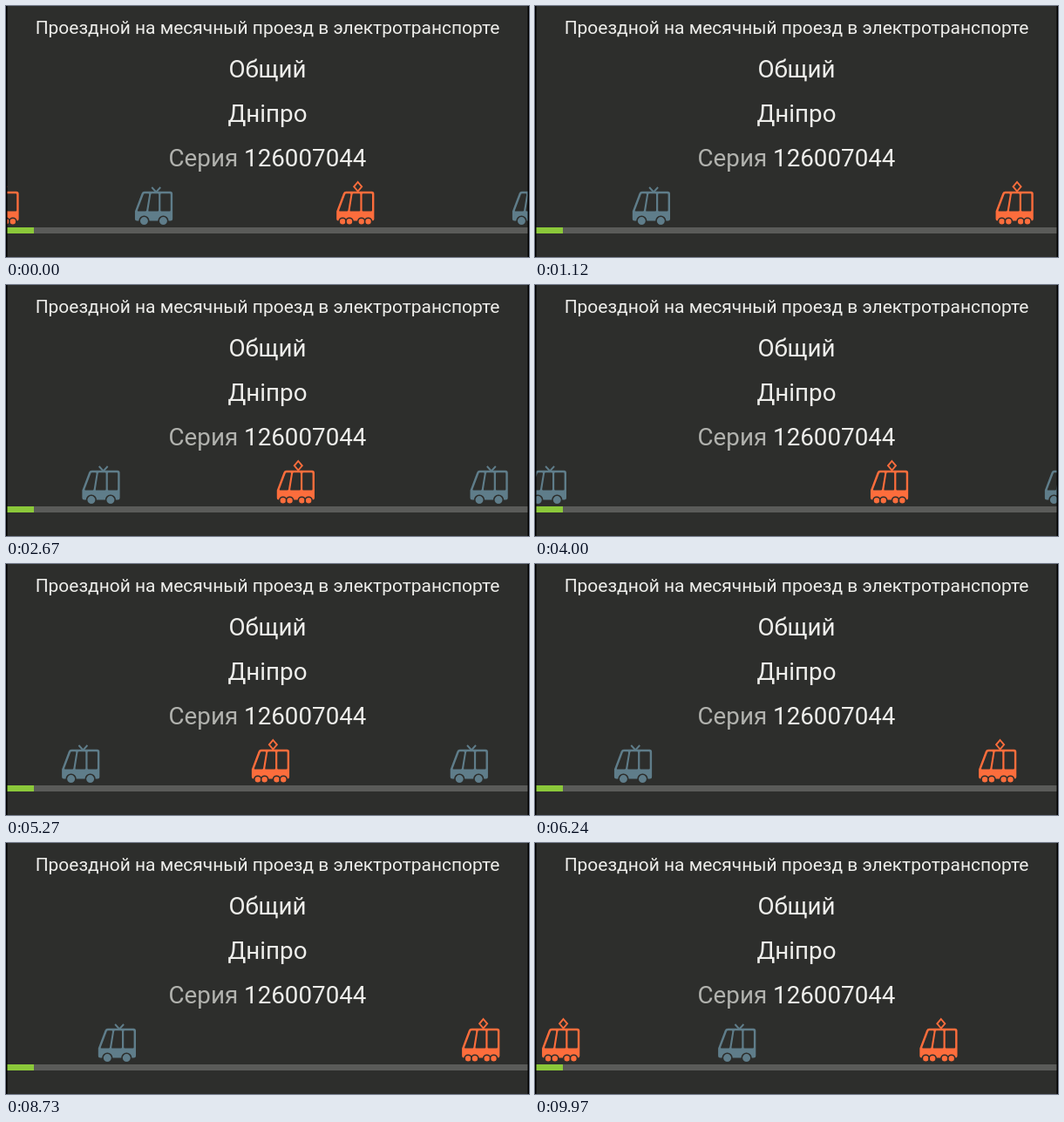
An HTML page for the animation above (10000 ms loop, 600 px wide and 288 px high).

```html
<!DOCTYPE html>
<html lang="ru">
<head>
<meta charset="utf-8">
<style>
html, body { margin: 0; width: 100%; height: 100%; overflow: hidden; background: #2d2e2c; }
svg { display: block; width: 600px; height: 288px; }
text { font-family: Roboto, sans-serif; font-size: 27.75px; fill: #eeeeeb; text-anchor: middle; }
.head { font-size: 20.96px; }
.dim { fill: #b1b2ae; }
.blue { fill: #5f7d8a; stroke: #5f7d8a; }
.orange { fill: #fd6d3c; stroke: #fd6d3c; }
.body { stroke: none; fill-rule: evenodd; }
.wire { fill: none; stroke-width: 1.9; }
.wheel { stroke: #2d2e2c; stroke-width: 1.6; }
</style>
</head>
<body>
<svg viewBox="0 0 600 288">
  <defs>
    <path id="cab" class="body" d="M11 12.7H40.5Q43.2 12.7 43.2 15.4V44Q43.2 46.5 40.7 46.5H2.5Q0 46.5 0 44V35.5L7.7 15Q8.6 12.7 11 12.7Z
      M11.2 15.2Q10.3 15.2 9.9 16.2L3 34.6Q2.7 35.6 3.7 35.6H12Q13 35.6 13.2 34.6L16.2 16.4Q16.3 15.2 15.2 15.2Z
      M19.5 15.2Q18.5 15.2 18.3 16.2L15.4 34.4Q15.3 35.6 16.4 35.6H26.2Q27.2 35.6 27.2 34.6V16.2Q27.2 15.2 26.2 15.2Z
      M30.4 15.2Q29.4 15.2 29.4 16.2V34.6Q29.4 35.6 30.4 35.6H39.8Q40.8 35.6 40.8 34.6V16.2Q40.8 15.2 39.8 15.2Z"/>
    <g id="trolley">
      <use href="#cab"/>
      <path class="wire" d="M19.3 8L24.3 13.5L29.3 8"/>
      <circle class="wheel" cx="10.5" cy="46.6" r="5.3"/>
      <circle class="wheel" cx="32.5" cy="46.6" r="5.3"/>
    </g>
    <g id="tram">
      <use href="#cab"/>
      <path class="wire" d="M24.5 2L29 7.3L24.5 12.6L20 7.3Z"/>
      <circle class="wheel" cx="7" cy="47.2" r="4"/>
      <circle class="wheel" cx="14.8" cy="47.2" r="4"/>
      <circle class="wheel" cx="28.6" cy="47.2" r="4"/>
      <circle class="wheel" cx="36.4" cy="47.2" r="4"/>
    </g>
  </defs>
  <rect width="600" height="288" fill="#2d2e2c"/>
  <text class="head" x="300" y="32.2">Проездной на месячный проезд в электротранспорте</text>
  <text x="300" y="82">Общий</text>
  <text x="300" y="133">Дніпро</text>
  <text x="300" y="184"><tspan class="dim">Серия</tspan> 126007044</text>
  <rect y="254" width="600" height="7" fill="#5a5b59"/>
  <rect y="254" width="32" height="7" fill="#8bc83a"/>
  <g id="road">
    <use href="#tram" class="orange"/>
    <use href="#trolley" class="blue"/>
    <use href="#tram" class="orange"/>
    <use href="#trolley" class="blue"/>
  </g>
  <rect width="1.5" height="288"/>
  <rect x="598.5" width="1.5" height="288"/>
</svg>
<script>
const LOOP = 10000, SPEED = 1.25 / 1000, START = 2.636;
const CYCLE = 3.16;               // half turn plus a short rest off stage
const MID = 294.5, REACH = 369;
const delays = [0, 0.658, 1.298, 1.955];
const cars = [...document.querySelectorAll('#road use')];

function draw(t) {
  const drift = 8 * Math.sin(2 * Math.PI * t / LOOP);
  const turn = START + SPEED * (t + drift);
  cars.forEach((car, i) => {
    const phase = (turn - delays[i] + CYCLE) % CYCLE;
    const x = MID + REACH * Math.cos(Math.min(phase, Math.PI));
    car.setAttribute('transform', `translate(${x.toFixed(2)} 200)`);
  });
}

const t0 = performance.now();
function tick() {
  draw((performance.now() - t0) % LOOP);
  requestAnimationFrame(tick);
}
draw(0);
requestAnimationFrame(tick);
</script>
</body>
</html>
```
